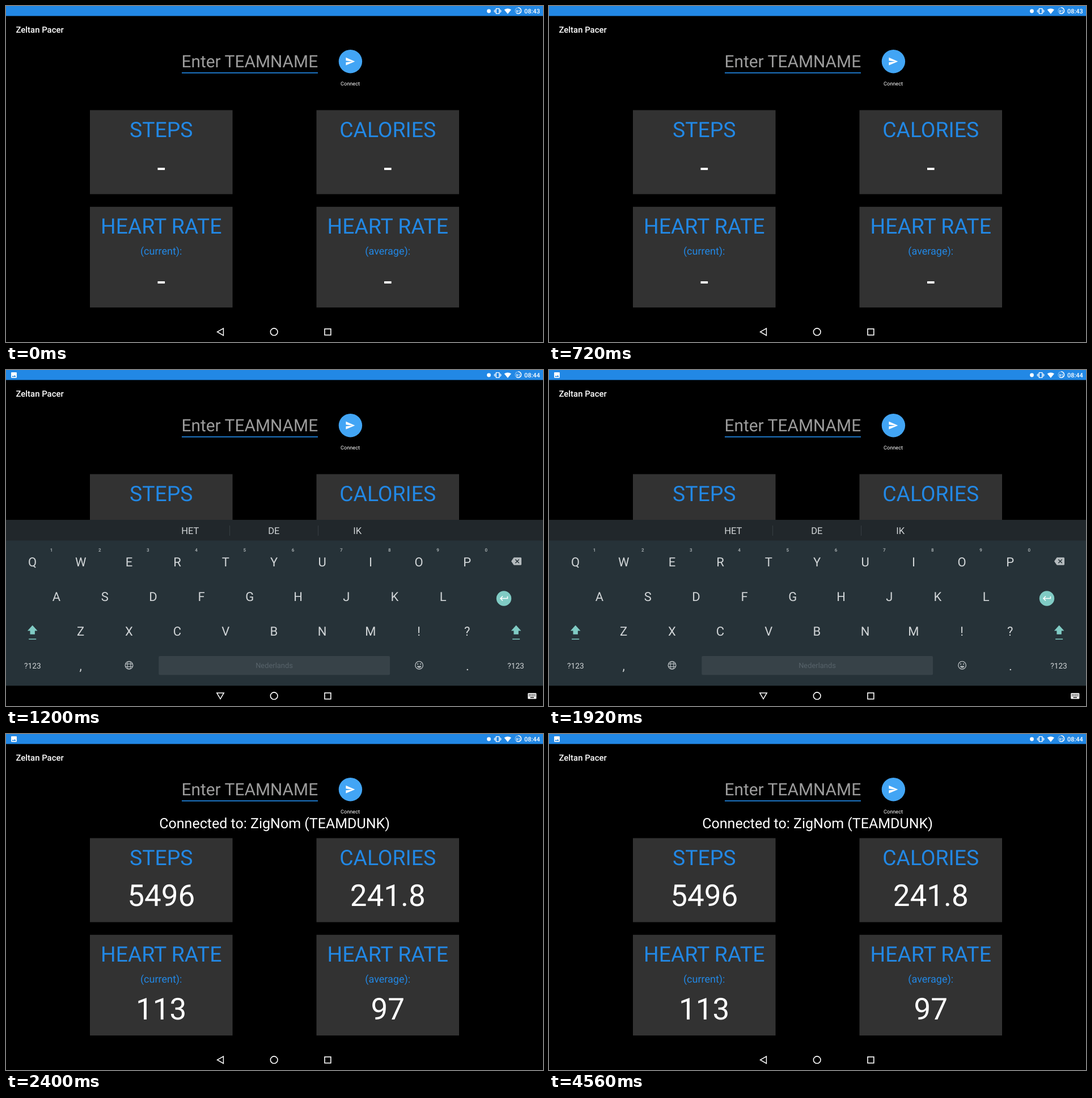
Animation of 947 by 592 pixels, one loop 6000 ms. Source, as an HTML page with a canvas:

```html
<!DOCTYPE html>
<html lang="en">
<head>
<meta charset="utf-8">
<title>Fitness dashboard</title>
<style>
  html, body { margin: 0; width: 100%; height: 100%; overflow: hidden; background: #000; }
  canvas { display: block; }
</style>
</head>
<body>
<canvas id="stage" width="947" height="592"></canvas>
<script>
const ctx = document.getElementById('stage').getContext('2d');
ctx.textRendering = 'geometricPrecision';

const LOOP = 6000, KEYBOARD_AT = 1200, CONNECTED_AT = 2400;
const BLUE = '#2288e5', LIGHT_BLUE = '#42a5f5', TEAL = '#80cbc4';
const BOARD = '#263238', KEY = '#d2d6d8', KEY_ICON = '#b4babd';

// Icon outlines on a 24-unit grid
const icons = {
  send: new Path2D('M2 21L23 12 2 3v7l15 2-15 2z'),
  erase: new Path2D('M22 3H7c-.7 0-1.2.35-1.6.9L0 12l5.4 8.1c.4.5.9.9 1.6.9h15c1.1 0 2-.9 2-2V5c0-1.1-.9-2-2-2zm-3 12.6L17.6 17 14 13.4 10.4 17 9 15.6 12.6 12 9 8.4 10.4 7 14 10.6 17.6 7 19 8.4 15.4 12z'),
  enter: new Path2D('M19 7v4H5.8l3.6-3.6L8 6l-6 6 6 6 1.4-1.4L5.8 13H21V7z'),
  picture: new Path2D('M21 19V5c0-1.1-.9-2-2-2H5c-1.1 0-2 .9-2 2v14c0 1.1.9 2 2 2h14c1.1 0 2-.9 2-2zM8.5 13.5l2.5 3 3.5-4.5 4.5 6H5z')
};

function text(str, x, baseline, size, color = '#fff', align = 'center', weight = 400) {
  ctx.font = `${weight} ${size}px Roboto, sans-serif`;
  ctx.textAlign = align;
  ctx.fillStyle = color;
  ctx.fillText(str, x, baseline);
}

function rect(x, y, w, h, color) {
  ctx.fillStyle = color;
  ctx.fillRect(x, y, w, h);
}

function roundRect(x, y, w, h, r, color) {
  ctx.fillStyle = color;
  ctx.beginPath();
  ctx.roundRect(x, y, w, h, r);
  ctx.fill();
}

function disc(x, y, r, color) {
  ctx.fillStyle = color;
  ctx.beginPath();
  ctx.arc(x, y, r, 0, Math.PI * 2);
  ctx.fill();
}

function ring(x, y, r, color, width, from = 0, to = Math.PI * 2) {
  ctx.strokeStyle = color;
  ctx.lineWidth = width;
  ctx.beginPath();
  ctx.arc(x, y, r, from, to);
  ctx.stroke();
}

function polygon(points, color, lineWidth) {
  ctx.beginPath();
  points.forEach(([x, y]) => ctx.lineTo(x, y));
  ctx.closePath();
  ctx.fillStyle = ctx.strokeStyle = color;
  if (lineWidth) {
    ctx.lineWidth = lineWidth;
    ctx.stroke();
  } else {
    ctx.fill();
  }
}

function icon(name, x, y, scale, color) {
  ctx.save();
  ctx.translate(x, y);
  ctx.scale(scale, scale);
  ctx.translate(-12, -12);
  ctx.fillStyle = color;
  ctx.fill(icons[name], 'evenodd');
  ctx.restore();
}

function statusBar(clock, hasPicture) {
  rect(0, 0, 947, 17.6, BLUE);
  if (hasPicture) icon('picture', 14, 9, 0.55, '#fff');
  disc(851.5, 9, 3.4, '#fff');

  ctx.strokeStyle = '#fff';
  ctx.lineWidth = 1.3;
  ctx.strokeRect(864.4, 4.6, 5.4, 8.8);
  for (const side of [-1, 1]) {
    rect(866.6 + side * 4.4, 6, 1, 6, '#fff');
    rect(866.6 + side * 6, 7.3, 1, 3.4, '#fff');
  }

  ctx.fillStyle = '#fff';
  ctx.beginPath();
  ctx.moveTo(884.8, 14);
  ctx.lineTo(878.6, 6.6);
  ctx.quadraticCurveTo(884.8, 2.4, 891, 6.6);
  ctx.fill();

  ring(903.3, 8.2, 5.2, 'rgba(255,255,255,.4)', 1.4);
  ring(903.3, 8.2, 5.2, '#fff', 1.5, -Math.PI / 2, Math.PI * 0.72);
  text('61', 903.3, 10.6, 6, '#fff', 'center', 700);
  text(clock, 914, 13, 10.9, '#fff', 'left', 500);
}

function header() {
  text('Zeltan Pacer', 17.5, 47.4, 14.9, '#fff', 'left', 500);
  text('Enter TEAMNAME', 309.5, 107.6, 29.9, '#9c9c9c', 'left');
  rect(310, 116.9, 240, 1.7, BLUE);
  disc(607.4, 97.7, 20.7, LIGHT_BLUE);
  icon('send', 607, 97.7, 0.76, '#fff');
  text('Connect', 607, 140, 9.15);
}

function card(x, y, h, title, note, value) {
  const mid = x + 125.7;
  rect(x, y, 251.5, h, '#323232');
  text(title, mid, y + 47.3, 37.4, BLUE);
  if (note) text(note, mid, y + 83.8, 18, BLUE);
  text(value, mid, y + h - 28.7, 53, '#fff');
}

function cards([steps, calories, current, average]) {
  card(148, 183.5, 148, 'STEPS', '', steps);
  card(547.5, 183.5, 148, 'CALORIES', '', calories);
  card(148, 353.8, 177.4, 'HEART RATE', '(current):', current);
  card(547.5, 353.8, 177.4, 'HEART RATE', '(average):', average);
}

function keyRow(letters, x, baseline) {
  [...letters].forEach((ch, i) => text(ch, x + i * 85.2, baseline, 22, KEY));
}

function shiftKey(x) {
  polygon([[x, 449.8], [x + 8.8, 459.5], [x + 4.2, 459.5], [x + 4.2, 465.8],
    [x - 4.2, 465.8], [x - 4.2, 459.5], [x - 8.8, 459.5]], TEAL);
  rect(x - 6.5, 473.4, 13, 1.5, TEAL);
}

function globe(x, y) {
  ring(x, y, 6.8, KEY_ICON, 1.4);
  ctx.lineWidth = 1.2;
  ctx.beginPath();
  ctx.ellipse(x, y, 3, 6.8, 0, 0, Math.PI * 2);
  for (const dy of [-2.4, 2.4]) {
    ctx.moveTo(x - 6.3, y + dy);
    ctx.lineTo(x + 6.3, y + dy);
  }
  ctx.stroke();
}

function smiley(x, y) {
  ring(x, y, 6.8, KEY_ICON, 1.4);
  disc(x - 2.5, y - 2, 1.1, KEY_ICON);
  disc(x + 2.5, y - 2, 1.1, KEY_ICON);
  ctx.beginPath();
  ctx.arc(x, y + 0.8, 3.8, 0.15, Math.PI - 0.15);
  ctx.fill();
}

function keyboard() {
  rect(0, 264, 947, 37, '#21272b');
  rect(0, 300.5, 947, 256, BOARD);
  ['HET', 'DE', 'IK'].forEach((word, i) => text(word, 324.8 + i * 147.5, 289, 16.6, KEY));
  rect(394, 274, 1, 18, '#363d42');
  rect(550, 274, 1, 18, '#363d42');

  keyRow('QWERTYUIOP', 46.5, 345.8);
  [...'1234567890'].forEach((n, i) => text(n, 80 + i * 85.2, 320.4, 8, '#a3aaad', 'center', 700));
  icon('erase', 900, 337, 0.75, KEY_ICON);

  keyRow('ASDFGHJKL', 89, 406.5);
  disc(878, 402.5, 13.2, TEAL);
  icon('enter', 878.4, 402.5, 0.75, '#fff');

  shiftKey(46.7);
  keyRow('ZXCVBNM!?', 131.6, 467.5);
  shiftKey(899.6);

  text('?123', 46.8, 526.3, 13.7, KEY);
  text(',', 131.7, 529, 22, KEY);
  globe(217, 520.2);
  roundRect(269.3, 504, 407.7, 33.3, 2, '#374248');
  text('Nederlands', 473, 525.4, 12.9, '#57636a');
  smiley(728.6, 520.2);
  text('.', 814, 529, 22, KEY);
  text('?123', 899, 526.3, 13.7, KEY);
}

function navBar(keyboardOpen) {
  rect(0, 556.5, 947, 35.5, '#000');
  const back = keyboardOpen
    ? [[371.8, 569], [384.2, 569], [378, 579.6]]
    : [[372.6, 574.2], [383.4, 568], [383.4, 580.4]];
  polygon(back, '#fff', 1.5);
  ring(472.7, 574.2, 6.3, '#fff', 1.6);
  ctx.strokeRect(562, 568.9, 10.8, 10.8);
  if (!keyboardOpen) return;
  roundRect(920.3, 569.2, 15, 10.4, 1.3, '#fff');
  for (let row = 0; row < 2; row++) {
    for (let col = 0; col < 5; col++) rect(922 + col * 2.5, 571 + row * 2.5, 1.4, 1.4, '#000');
  }
  rect(924.5, 576.3, 6.6, 1.4, '#000');
}

function draw(time) {
  const typing = time >= KEYBOARD_AT && time < CONNECTED_AT;
  const connected = time >= CONNECTED_AT;
  rect(0, 0, 947, 592, '#000');
  statusBar(time < KEYBOARD_AT ? '08:43' : '08:44', time >= KEYBOARD_AT);
  header();
  cards(connected ? ['5496', '241.8', '113', '97'] : ['-', '-', '-', '-']);
  if (connected) text('Connected to: ZigNom (TEAMDUNK)', 473.6, 165.8, 25);
  if (typing) keyboard();
  navBar(typing);
}

const start = performance.now();
function tick() {
  draw((performance.now() - start) % LOOP);
  requestAnimationFrame(tick);
}
tick();
</script>
</body>
</html>
```
